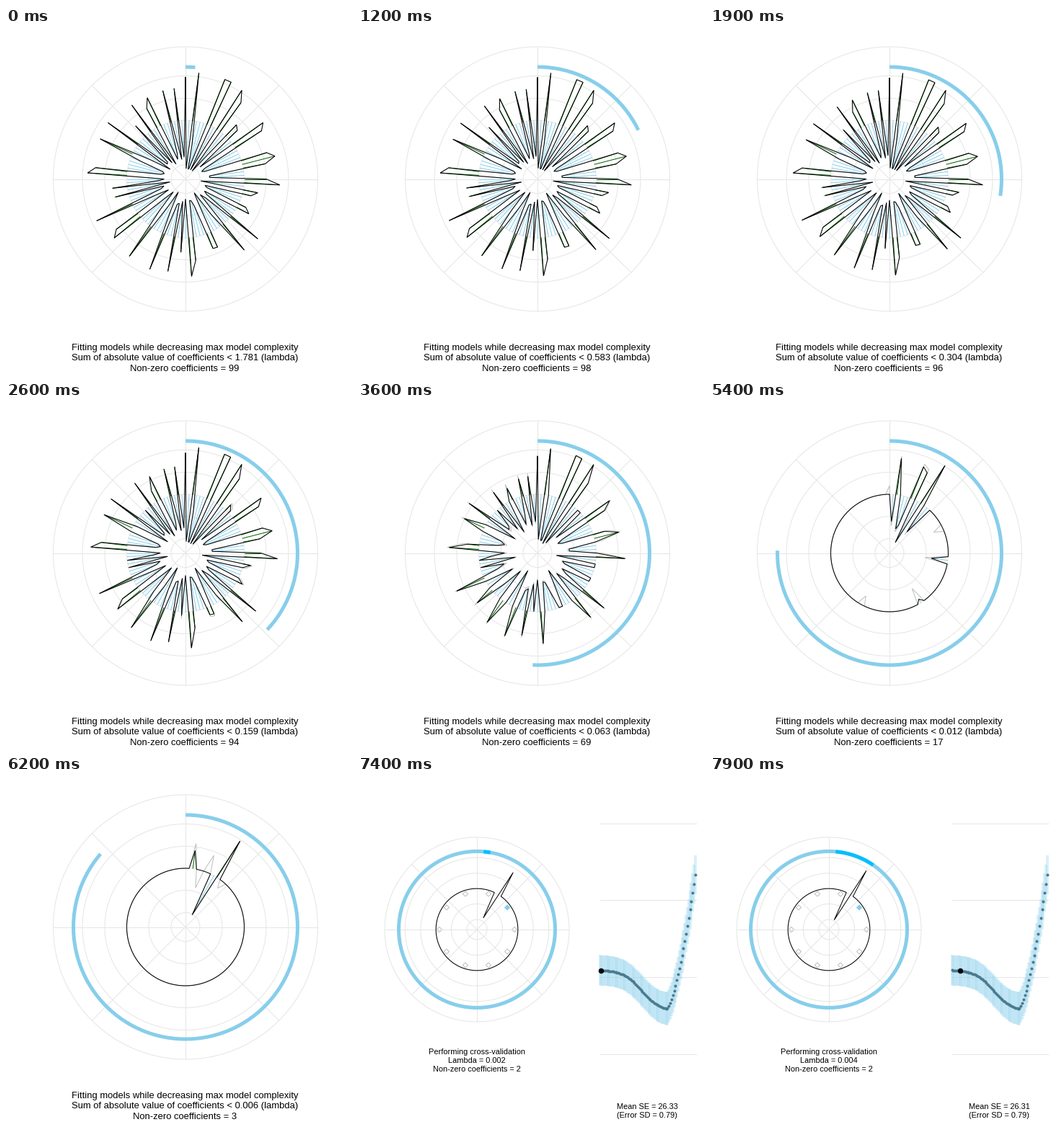
Write a matplotlib script that moves like this. It is 480 px wide and 480 px high and loops after 8000 ms.

```python
import numpy as np
import matplotlib.pyplot as plt
from matplotlib.animation import FuncAnimation
from matplotlib.collections import LineCollection

SIZE, DPI = 480, 100
STEPS, FRAMES = 73, 80
TURN = 2 * np.pi
BASE = 81.5                      # radius that stands for a zero coefficient
RATE = np.log(1e4) / 99          # decay of log(lambda) per step
SKY, DEEP, GREEN = "#87ceeb", "#00bfff", "#006400"
GRID, GHOST = "#e5e5e5", "#bebebe"

# Where the positive coefficients peak, clockwise from the top
MAJOR = [0, 2, 6.5, 9.5, 15, 21, 26, 36, 39, 49, 53, 56, 60, 64.4, 68, 76,
         82.4, 85, 90, 92.5, 96, 98, 100]
MINOR = [12.5, 28, 33, 43.5, 51, 71, 73, 88]
LAST = {2: 64, 4: 62, 6: 62, 8: 84, 9: 84}   # longest surviving coefficients

rng = np.random.default_rng(7)
INDEX = np.arange(100)
ANGLE = INDEX * TURN / 100


def full_model():
    peaks = sorted(MAJOR + MINOR)
    wave = np.cos(TURN * np.interp(INDEX, peaks, range(len(peaks)))) - 0.2
    height = np.interp(INDEX, peaks, [0.4 if p in MINOR else 1 for p in peaks])
    size = 51 + 52 * np.exp(-((INDEX - 6) / 4.5) ** 2)
    size *= np.where(wave > 0, height, 1) * rng.uniform(0.88, 1.08, 100)
    shape = np.sign(wave) * (np.abs(wave) / 0.8) ** 0.25
    return np.clip(size * shape, -67, 67)


COEF = full_model()
# Step at which each coefficient is shrunk to zero
VANISH = 20 + 39 * (np.abs(COEF) / 67) ** 1.5 + 3 * np.cos(ANGLE - TURN * 0.28)
VANISH[list(LAST)] = list(LAST.values())

# Cross-validation curve: a smooth dip, then a steep rise
DOT_X = np.linspace(335, 467.5, STEPS)
DOT_Y = (268.3 + 58 / (1 + np.exp((393 - DOT_X) / 13))
         - 0.9 * np.clip(DOT_X - 427.5, 0, None) ** 1.45)
SPREAD = 21 + 6 * np.linspace(0, 1, STEPS) ** 3
UNIT = 26.7                      # pixels per unit of squared error

fig = plt.figure(figsize=(SIZE / DPI, SIZE / DPI), dpi=DPI, facecolor="white")
ax = fig.add_axes([0, 0, 1, 1])


def px(n):
    return n * 72 / DPI


def coefs(k):
    left = 1 - np.exp(RATE * (k - VANISH))
    start = 1 - np.exp(-RATE * VANISH)
    return COEF * (np.clip(left, 0, None) / start) ** 0.55


def bound(k):
    return 1.781 * np.exp(-RATE * k)


def count(k):
    return round(np.interp(k, [0, 12, 26, 36, 47, 62, 66],
                           [99, 98, 94, 69, 29, 3, 2]))


def polar(center, angle, radius):
    return center[0] + radius * np.sin(angle), center[1] - radius * np.cos(angle)


def line(x, y, color, width=1):
    ax.plot(x, y, color=color, lw=px(width), solid_capstyle="butt",
            solid_joinstyle="bevel")


def arc(center, radius, start, stop, color, width=1):
    n = max(2, int(abs(stop - start) * 20))
    line(*polar(center, np.linspace(start, stop, n), radius), color, width)


def segments(x0, y0, x1, y1, color, width=1, **kw):
    pairs = np.stack([np.column_stack([x0, y0]), np.column_stack([x1, y1])], 1)
    ax.add_collection(LineCollection(pairs, colors=color, linewidths=px(width),
                                     **kw))


def text(x, top, pitch, size, rows):
    for i, row in enumerate(rows):
        ax.text(x, top + i * pitch, row, ha="center", va="baseline",
                fontsize=px(size), family="Liberation Sans", color="black")


def grid(center, scale):
    for r in (20, 51, 81.5, 112, 143, 183.5):
        arc(center, r * scale, 0, TURN, GRID)
    for a in np.arange(4) * np.pi / 4:
        line(*polar(center, a, np.array([-183.5, 183.5]) * scale), GRID)


def outline(center, scale, values, color):
    x, y = polar(center, ANGLE, (BASE + values) * scale)
    line(np.append(x, x[0]), np.append(y, y[0]), color)


def draw_fit(k):
    center = 248.5, 209
    values = coefs(k)
    grid(center, 1)
    outline(center, 1, coefs(max(k - 2, 0)), GHOST)
    for mask, color in ((values < 0, SKY), (values > 0, GREEN)):
        a = ANGLE[mask]
        segments(*polar(center, a, BASE),
                 *polar(center, a, BASE + values[mask]), color)
    outline(center, 1, values, "black")
    arc(center, 155.5, 0, (k + 1) * TURN / STEPS, SKY, 5)
    text(247.6, 447, 14, 13, [
        "Fitting models while decreasing max model complexity",
        f"Sum of absolute value of coefficients < {bound(k):.3f} (lambda)",
        f"Non-zero coefficients = {count(k)}"])


def draw_validation(j):
    center, scale = (164.5, 212.5), 0.6975
    k = STEPS - 1 - j
    grid(center, scale)
    outline(center, scale, coefs(k), "black")
    arc(center, 108.5, 0, TURN, SKY, 5)
    arc(center, 108.5, TURN / STEPS, (j + 1) * TURN / STEPS, DEEP, 5)
    folds = np.arange(10)
    x, y = polar(center, (folds + 0.5) * TURN / 10, 52)
    ax.scatter(x, y, s=px(5) ** 2, marker="D", linewidths=px(1),
               facecolors=np.where(folds == 1, SKY, "none"),
               edgecolors=np.where(folds == 1, SKY, GHOST))
    text(164, 386, 12, 11, ["Performing cross-validation",
                            f"Lambda = {bound(k):.3f}",
                            f"Non-zero coefficients = {count(k)}"])

    for gy in np.linspace(65, 385, 4):
        line([334, 469], [gy, gy], GRID)
    segments(DOT_X, DOT_Y - SPREAD, DOT_X, DOT_Y + SPREAD, SKY, 4, alpha=0.3)
    ax.scatter(DOT_X, DOT_Y, s=px(4) ** 2, color="#4a7a8c", linewidths=0, zorder=3)
    ax.scatter(DOT_X[j], DOT_Y[j], s=px(7.5) ** 2, color="black", linewidths=0,
               zorder=4)
    text(400.5, 461, 12, 11, [f"Mean SE = {26 + (278 - DOT_Y[j]) / UNIT:.2f}",
                              f"(Error SD = {SPREAD[j] / UNIT:.2f})"])


def draw(frame):
    ax.clear()
    ax.axis("off")
    if frame < STEPS:
        draw_fit(frame)
    else:
        draw_validation(frame - STEPS)
    ax.set_xlim(-0.5, SIZE - 0.5)
    ax.set_ylim(SIZE - 0.5, -0.5)
    return []


anim = FuncAnimation(fig, draw, frames=FRAMES, interval=100, repeat=True,
                     repeat_delay=0, init_func=lambda: [])
plt.show()
```
